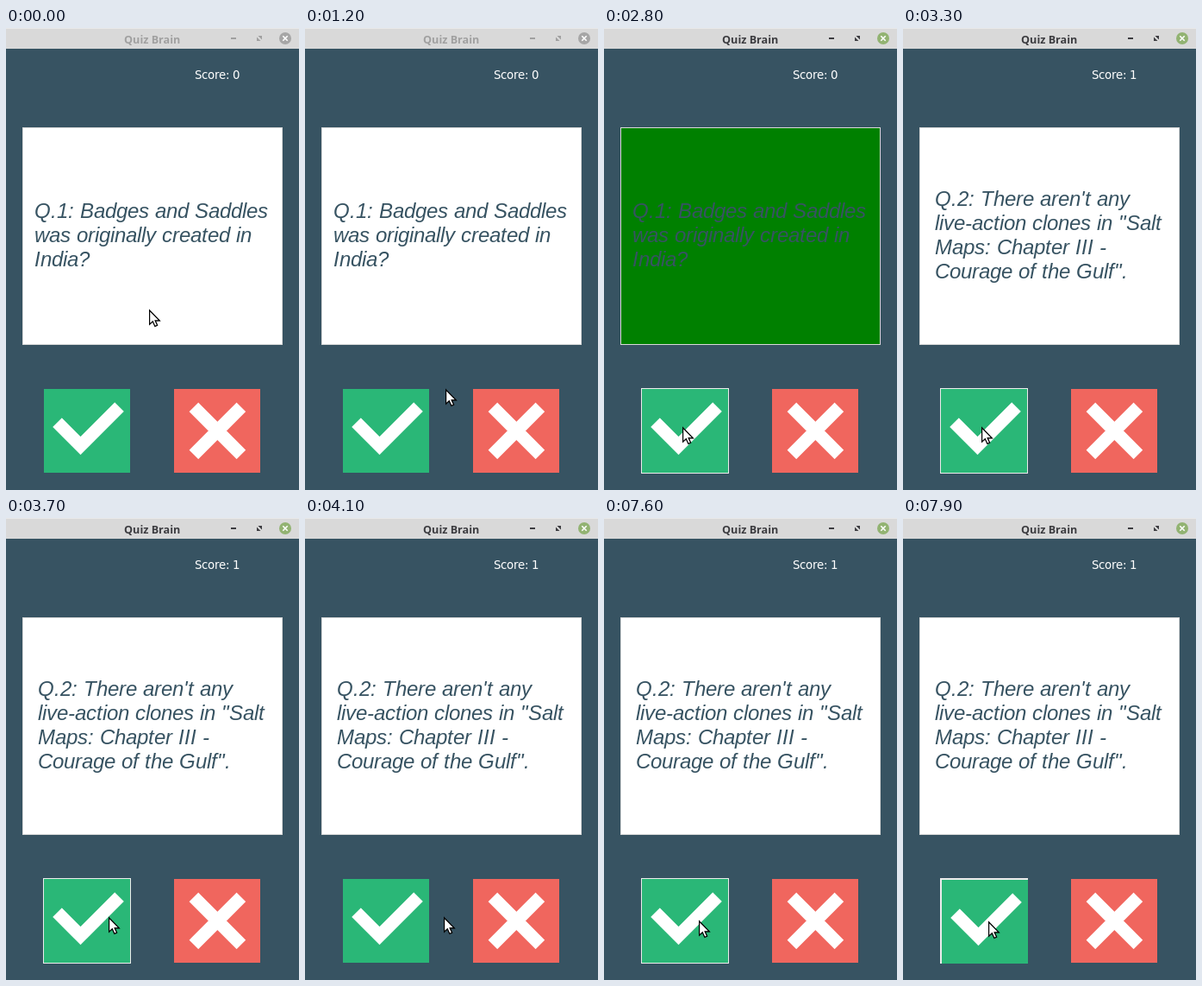
Recreate the animation shown at these times as an HTML page. Size 340 by 535 pixels, loop 8 s.

```html
<!DOCTYPE html>
<html lang="en">
<head>
<meta charset="utf-8">
<title>Quiz Brain</title>
<style>
  html, body { margin: 0; width: 100%; height: 100%; overflow: hidden; background: #375362; }
  svg { display: block; width: 340px; height: 535px; }
  text { white-space: pre; }
  #title { font: bold 12.6px "Noto Sans", sans-serif; text-anchor: middle; }
  #cursor { filter: drop-shadow(.5px .6px .5px rgba(0, 0, 0, .5)); }
</style>
</head>
<body>
<svg viewBox="0 0 340 535">
  <rect width="340" height="535" fill="#375362"/>
  <rect width="340" height="24" fill="#d9d9d9"/>
  <rect width="340" height="1" fill="#e9e9e9"/>
  <g id="controls">
    <text id="title" x="169.7" y="18">Quiz Brain</text>
    <path d="M261 11h6v2h-6zM292.5 9h4.5v4.5zM291 10.5v4.5h4.5z"/>
  </g>
  <circle id="close" cx="324" cy="12" r="7"/>
  <path d="M321.3 9.3l5.4 5.4m0-5.4l-5.4 5.4" stroke="#fff" stroke-width="1.6"/>

  <text id="score" fill="#fff"></text>
  <rect id="card" x="19.5" y="115.5" width="301" height="251" stroke="#d9d9d9"/>
  <text id="question" fill="#375362"></text>

  <rect id="frame" x="43" y="417" width="102" height="99" fill="#ececec"/>
  <g id="yes">
    <rect x="44" y="418" width="100" height="97" fill="#2ab777"/>
    <path d="M59.5 456.7l27 27l45-45" fill="none" stroke="#fff" stroke-width="15"/>
  </g>
  <rect x="195" y="418" width="100" height="97" fill="#f0665e"/>
  <path d="M217.9 439l55 55m0-55l-55 55" stroke="#fff" stroke-width="15"/>

  <path id="cursor" d="M.6 1V17.2L4.3 13.8L6.9 19.4L9.6 18.2L7.1 12.8H12.2z" fill="#fff" stroke="#000" stroke-width="1.2"/>
</svg>
<script>
  const $ = id => document.getElementById(id);
  const LOOP = 8000, STEP = 100;
  const ANSWERED = 2800, NEXT = 3300, PRESSED = 7900;

  const CENTER_X = 169, CENTER_Y = 240, LINE_HEIGHT = 28, ASCENT = 22;
  const SCORE_FONT = '13.33px "DejaVu Sans", sans-serif';
  const QUESTION_FONT = 'italic 24px "Liberation Sans", Arial, sans-serif';
  const QUESTIONS = [
    ['Q.1: Badges and Saddles', 'was originally created in', 'India?'],
    ["Q.2: There aren't any", 'live-action clones in "Salt', 'Maps: Chapter III -', 'Courage of the Gulf".']
  ];

  // Pointer stops: time, x, y
  const STOPS = [
    [0, 166, 326], [400, 166, 326], [800, 166, 369], [900, 166, 369],
    [1400, 162, 445], [2100, 162, 445], [2600, 91, 462], [3400, 91, 462],
    [4100, 161, 462], [7300, 161, 462], [7400, 140, 465], [7700, 99, 467],
    [LOOP, 99, 467]
  ];

  function pointerAt(time) {
    const i = STOPS.findIndex(stop => stop[0] > time);
    const [t0, x0, y0] = STOPS[i - 1], [t1, x1, y1] = STOPS[i];
    const p = (time - t0) / (t1 - t0), eased = p * p * (3 - 2 * p);
    return [x0 + (x1 - x0) * eased, y0 + (y1 - y0) * eased].map(Math.round);
  }

  // Left-aligned block around a centre, every glyph on whole pixels
  const ruler = document.createElement('canvas').getContext('2d');
  function setText(node, font, lines, centerX, baseline) {
    ruler.font = node.style.font = font;
    const advances = lines.map(line => [...line].map(c => Math.round(ruler.measureText(c).width)));
    const widths = advances.map(row => row.reduce((a, b) => a + b));
    const left = centerX - Math.round(Math.max(...widths) / 2);
    node.replaceChildren(...lines.map((line, i) => {
      const span = document.createElementNS('http://www.w3.org/2000/svg', 'tspan');
      let x = left;
      span.setAttribute('x', advances[i].map(w => (x += w) - w).join(' '));
      span.setAttribute('y', baseline + LINE_HEIGHT * i);
      span.textContent = line;
      return span;
    }));
  }

  let shown = -1;
  function showQuestion(index) {
    if (index === shown) return;
    shown = index;
    const lines = QUESTIONS[index];
    const baseline = CENTER_Y - lines.length * LINE_HEIGHT / 2 + ASCENT;
    setText($('question'), QUESTION_FONT, lines, CENTER_X, baseline);
    setText($('score'), SCORE_FONT, [`Score: ${index}`], 245, 59);
  }

  function draw(now) {
    const time = Math.floor(now % LOOP / STEP) * STEP;
    const [x, y] = pointerAt(time);
    const focused = time >= ANSWERED, pressed = time >= PRESSED;
    const hovered = x < 140 && y > 417;

    showQuestion(time >= NEXT ? 1 : 0);
    $('controls').setAttribute('fill', focused ? '#3c3c40' : '#a0a0a0');
    $('close').setAttribute('fill', focused ? '#92b372' : '#a6a6a6');
    $('card').setAttribute('fill', focused && time < NEXT ? '#008000' : '#fff');
    $('frame').setAttribute('visibility', hovered ? 'visible' : 'hidden');
    $('yes').setAttribute('transform', pressed ? 'translate(1 1)' : '');
    $('cursor').setAttribute('transform', `translate(${x} ${y})`);
  }

  const start = performance.now();
  function tick() {
    draw(performance.now() - start);
    requestAnimationFrame(tick);
  }
  tick();
</script>
</body>
</html>
```
